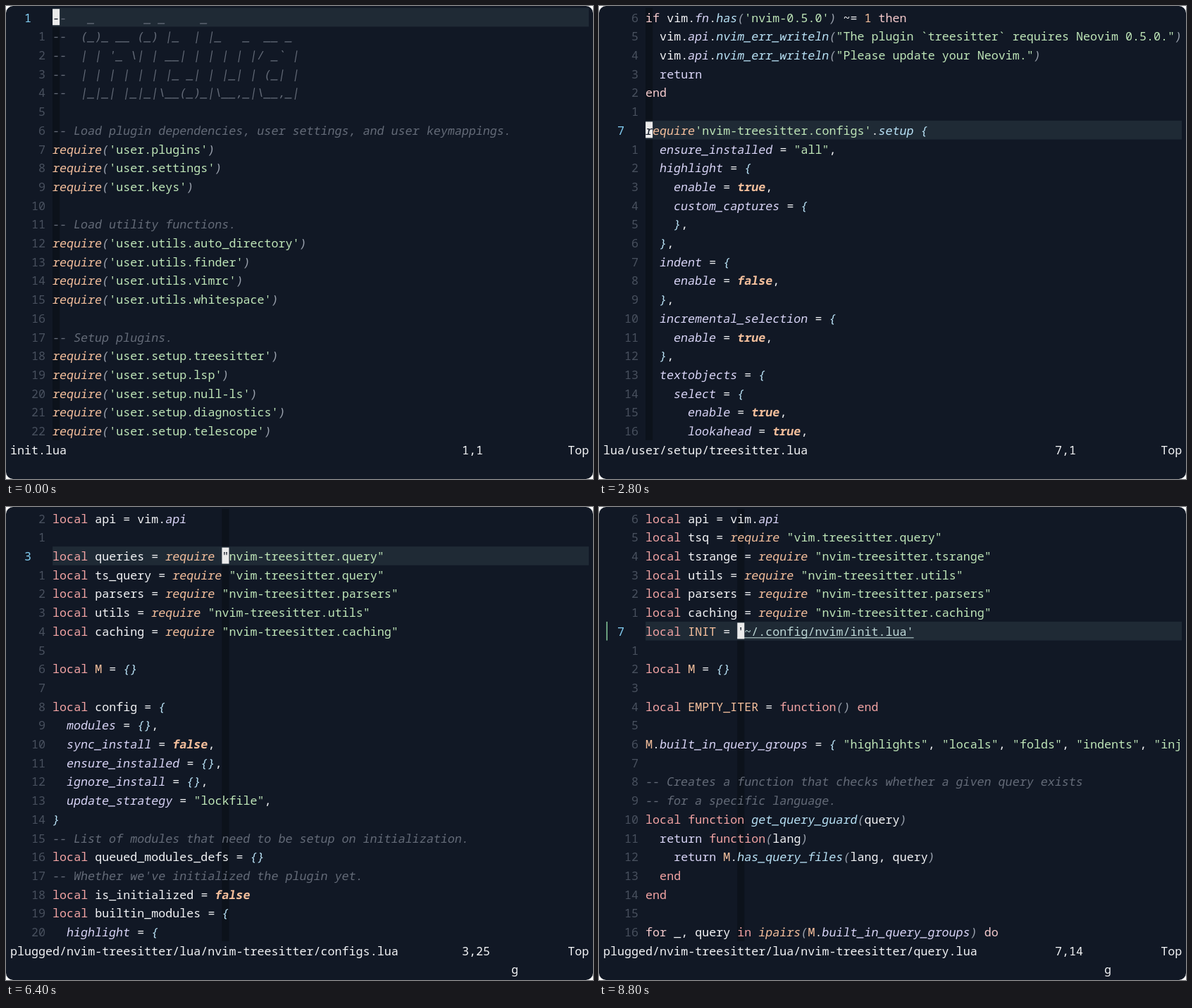
Animation of 833 by 672 pixels, one loop 9.2 s. Source, as an HTML page with a canvas:

```html
<!DOCTYPE html>
<html lang="en">
<head>
<meta charset="utf-8">
<title>Following files in an editor</title>
<style>
html, body { margin: 0; width: 100%; height: 100%; overflow: hidden; background: #fff; }
canvas { display: block; width: 833px; height: 672px; }
</style>
</head>
<body>
<canvas id="screen"></canvas>

<script type="text/plain" class="file" data-path="init.lua">
--   _       _ _     _
--  (_)_ __ (_) |_  | |_   _  __ _
--  | | '_ \| | __| | | | | |/ _` |
--  | | | | | | |_ _| | |_| | (_| |
--  |_|_| |_|_|\__(_)_|\__,_|\__,_|

-- Load plugin dependencies, user settings, and user keymappings.
require('user.plugins')
require('user.settings')
require('user.keys')

-- Load utility functions.
require('user.utils.auto_directory')
require('user.utils.finder')
require('user.utils.vimrc')
require('user.utils.whitespace')

-- Setup plugins.
require('user.setup.treesitter')
require('user.setup.lsp')
require('user.setup.null-ls')
require('user.setup.diagnostics')
require('user.setup.telescope')
</script>

<script type="text/plain" class="file" data-path="lua/user/setup/treesitter.lua">
if vim.fn.has('nvim-0.5.0') ~= 1 then
  vim.api.nvim_err_writeln("The plugin `treesitter` requires Neovim 0.5.0.")
  vim.api.nvim_err_writeln("Please update your Neovim.")
  return
end

require'nvim-treesitter.configs'.setup {
  ensure_installed = "all",
  highlight = {
    enable = true,
    custom_captures = {
    },
  },
  indent = {
    enable = false,
  },
  incremental_selection = {
    enable = true,
  },
  textobjects = {
    select = {
      enable = true,
      lookahead = true,
</script>

<script type="text/plain" class="file" data-path="plugged/nvim-treesitter/lua/nvim-treesitter/configs.lua">
local api = vim.api

local queries = require "nvim-treesitter.query"
local ts_query = require "vim.treesitter.query"
local parsers = require "nvim-treesitter.parsers"
local utils = require "nvim-treesitter.utils"
local caching = require "nvim-treesitter.caching"

local M = {}

local config = {
  modules = {},
  sync_install = false,
  ensure_installed = {},
  ignore_install = {},
  update_strategy = "lockfile",
}
-- List of modules that need to be setup on initialization.
local queued_modules_defs = {}
-- Whether we've initialized the plugin yet.
local is_initialized = false
local builtin_modules = {
  highlight = {
</script>

<script type="text/plain" class="file" data-path="plugged/nvim-treesitter/lua/nvim-treesitter/query.lua">
local api = vim.api
local tsq = require "vim.treesitter.query"
local tsrange = require "nvim-treesitter.tsrange"
local utils = require "nvim-treesitter.utils"
local parsers = require "nvim-treesitter.parsers"
local caching = require "nvim-treesitter.caching"
local INIT = '~/.config/nvim/init.lua'

local M = {}

local EMPTY_ITER = function() end

M.built_in_query_groups = { "highlights", "locals", "folds", "indents", "inj

-- Creates a function that checks whether a given query exists
-- for a specific language.
local function get_query_guard(query)
  return function(lang)
    return M.has_query_files(lang, query)
  end
end

for _, query in ipairs(M.built_in_query_groups) do
</script>

<script>
const W = 833, H = 672, STEP = 400;
const LEFT = 6, TOP = 2.7, CW = 10.015, RH = 26.7, BASE = 19.9;
const GUTTER = 6, ROWS = 23, RIGHT = 827;
const FONT = '16.69px "Noto Sans Mono", "DejaVu Sans Mono", monospace';
const SLANT = 0.17, PIVOT = 5;
const BG = '#111825', LINE = '#1f2a35', COLUMN = '#0c121b', CURSOR = '#ebebeb';

// Each style: colour, slanted, weight
const STYLE = {
  text: ['#f3f4f6'],
  number: ['#48505e'],
  current: ['#82cdf2'],
  comment: ['#646b78', true],
  string: ['#bfe6b8'],
  link: ['#bfd9d8'],
  builtin: ['#f4bf9c', true],
  bool: ['#f4bf9c', true, 600],
  constant: ['#f4bf9c'],
  keyword: ['#f2a3a3'],
  flow: ['#f6cbcd'],
  ret: ['#d9d5f7'],
  field: ['#d9d5f7', true],
  call: ['#b9e2f6', true],
  paren: ['#9aa1ad', true]
};
const WORDS = {
  local: 'keyword', function: 'keyword', in: 'keyword',
  if: 'flow', then: 'flow', for: 'flow', do: 'flow', return: 'ret',
  require: 'builtin', ipairs: 'builtin', true: 'bool', false: 'bool'
};
const TOKEN = /--.*|"[^"]*"?|'[^']*'|[A-Za-z_]\w*|\d+|[^\s]/g;

function wordStyle(word, before, after, blocks) {
  if (word === 'end') return blocks.pop() || 'keyword';
  if (Object.hasOwn(WORDS, word)) {
    if (/^(function|if|for)$/.test(word)) blocks.push(WORDS[word]);
    return WORDS[word];
  }
  if (/^[A-Z][A-Z_]*$/.test(word)) return 'constant';
  if (/^(\(| \{)/.test(after)) return 'call';
  const isKey = /^\s+$/.test(before) && after.startsWith(' =');
  return isKey || before.endsWith('.') ? 'field' : 'text';
}

function tokenize(line, blocks) {
  return Array.from(line.matchAll(TOKEN), m => {
    const text = m[0], col = m.index;
    let style = 'text';
    if (text.startsWith('--')) style = 'comment';
    else if (/^["']/.test(text)) style = 'string';
    else if (/^\d/.test(text)) style = 'constant';
    else if (/^[()]/.test(text)) style = 'paren';
    else if (/^[{}]/.test(text)) style = 'call';
    else if (/^\w/.test(text))
      style = wordStyle(text, line.slice(0, col), line.slice(col + text.length), blocks);
    return { text, col, style };
  });
}

const files = Array.from(document.querySelectorAll('.file'), el => {
  const blocks = [];
  const lines = el.textContent.slice(1).trimEnd().split('\n');
  return { path: el.dataset.path, lines: lines.map(l => tokenize(l, blocks)) };
});

// Jump down to a line, find its quote, go to the file named there
function visit(file, row, col) {
  return [
    { file, row: 0, col: 0, cmd: '' },
    { file, row: 0, col: 0, cmd: String(row) },
    { file, row, col: 0, cmd: '' },
    { file, row, col: 0, cmd: 'f' },
    { file, row, col, cmd: '' },
    { file, row, col, cmd: 'g' }
  ];
}
const first = visit(files[0], 18, 8);
first.splice(2, 1);
const steps = [
  ...first,
  ...visit(files[1], 6, 7),
  ...visit(files[2], 2, 24),
  ...visit(files[3], 6, 13)
];
steps[steps.length - 1].link = true;

const canvas = document.getElementById('screen');
const ctx = canvas.getContext('2d');
const ratio = window.devicePixelRatio || 1;
canvas.width = W * ratio;
canvas.height = H * ratio;
ctx.scale(ratio, ratio);

const xOf = col => LEFT + col * CW;
const yOf = row => TOP + row * RH;

function box(x, y, w, h, color) {
  ctx.fillStyle = color;
  ctx.fillRect(x, y, w, h);
}

// Slanted text leans around the middle of its small letters
function put(text, col, row, style, color) {
  const [ink, slanted, weight = 400] = STYLE[style];
  const lean = slanted ? SLANT : 0;
  ctx.save();
  ctx.font = `${weight} ${FONT}`;
  ctx.fillStyle = color || ink;
  ctx.transform(1, 0, -lean, 1, xOf(col) - lean * PIVOT, yOf(row) + BASE);
  ctx.fillText(text, 0, 0);
  ctx.restore();
}

function drawNumbers(cur) {
  for (let r = 0; r < ROWS; r++) {
    if (r === cur) {
      put(String(r + 1), 2, r, 'current');
    } else {
      const n = String(Math.abs(r - cur));
      put(n, 5 - n.length, r, 'number');
    }
  }
}

function drawCursor({ file, row, col }) {
  box(xOf(GUTTER + col), yOf(row) + 1.5, CW, 23, CURSOR);
  const tok = file.lines[row].find(t => col >= t.col && col < t.col + t.text.length);
  if (tok) put(tok.text[col - tok.col], GUTTER + col, row, tok.style, BG);
}

function draw(step) {
  const { file, row, col, cmd, link } = step;
  const x = xOf(GUTTER);
  ctx.clearRect(0, 0, W, H);
  ctx.fillStyle = BG;
  ctx.beginPath();
  ctx.roundRect(0, 0, W, H, 10);
  ctx.fill();

  box(xOf(GUTTER + col), TOP, CW, ROWS * RH, COLUMN);
  box(x, yOf(row), RIGHT - x, RH, LINE);
  if (file === files[3]) box(10.5, yOf(6), 1.5, RH, '#86c99a');

  drawNumbers(row);
  file.lines.forEach((line, r) => {
    for (const t of line) {
      const linked = link && r === row && t.col === col;
      put(t.text, GUTTER + t.col, r, linked ? 'link' : t.style);
      if (linked)
        box(xOf(GUTTER + col), yOf(r) + BASE + 2.5, t.text.length * CW, 1, STYLE.link[0]);
    }
  });
  drawCursor(step);

  put(file.path, 0, ROWS, 'text');
  put(`${row + 1},${col + 1}`, 64, ROWS, 'text');
  put('Top', 79, ROWS, 'text');
  put(cmd, 71, ROWS + 1, 'text');
}

const start = performance.now();
function tick() {
  const t = performance.now() - start;
  draw(steps[Math.floor(t / STEP) % steps.length]);
  requestAnimationFrame(tick);
}
tick();
</script>
</body>
</html>
```
